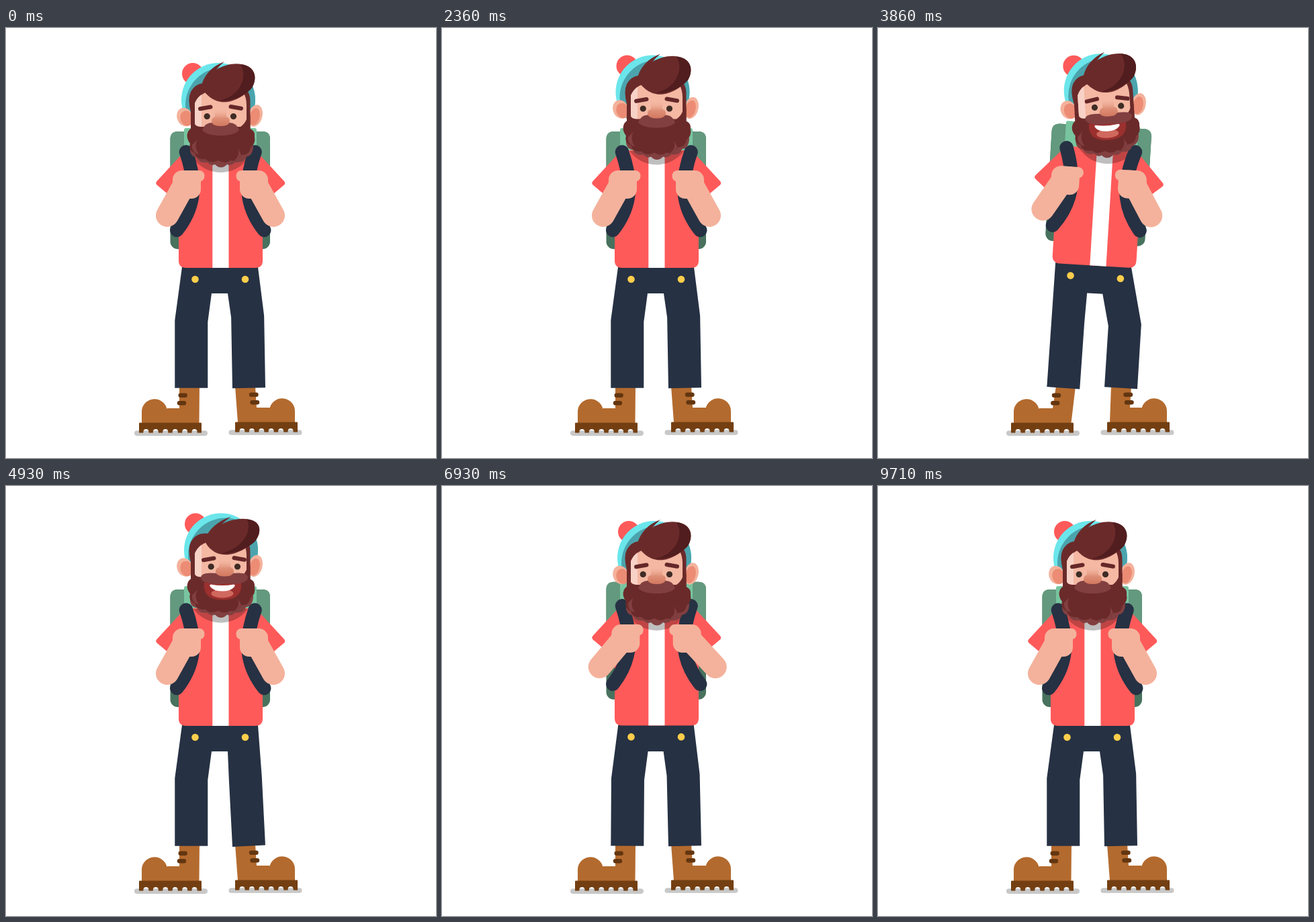
An HTML page that plays this animation: 640x640 px, repeating every 9780 ms.

```html
<!DOCTYPE html>
<html lang="en">
<head>
<meta charset="utf-8">
<title>Hiker</title>
<style>
html, body { margin: 0; width: 100%; height: 100%; overflow: hidden; background: #fff; }
svg { display: block; width: 100%; height: 100%; }
.round { fill: none; stroke-linecap: round; }
.navy { fill: #263143; }
.red { fill: #ff5a5a; }
.skin { fill: #f4b29c; }
.hair { fill: #6b2a2a; }
.light-hair { fill: #813f40; }
.leather { fill: #b36a2e; }
.sole { fill: #733f12; }
</style>
</head>
<body>
<svg viewBox="0 0 640 640">
  <defs>
    <linearGradient id="noseTone" x1="0" y1="120" x2="0" y2="146" gradientUnits="userSpaceOnUse">
      <stop offset="0" stop-color="#f2b59f" stop-opacity="0"/>
      <stop offset=".55" stop-color="#df8f77"/>
      <stop offset="1" stop-color="#d2785f"/>
    </linearGradient>
    <clipPath id="hatClip"><circle cx="316" cy="107" r="55"/></clipPath>
    <clipPath id="shirtClip"><path d="M262 183H377V357H262Z"/></clipPath>
    <path id="strap" class="round" stroke="#263143" stroke-width="20.5" d="M268 184.5C282 225 285 262 254.3 301"/>
    <path id="sleeve" class="red" d="M268 181L224.5 228Q222 231 224.5 233.5L240 246.5L266 226Z"/>
    <g id="fist" class="skin">
      <rect x="248" y="212" width="42" height="42" rx="14"/>
      <rect x="256" y="212" width="39.5" height="16.5" rx="8"/>
    </g>
  </defs>

  <g fill="#c8c8c8">
    <rect x="191" y="599.3" width="109" height="7.6" rx="3.8"/>
    <rect x="331.5" y="598.2" width="109" height="7.6" rx="3.8"/>
  </g>
  <path class="leather" id="bootL"/>
  <path class="leather" id="bootR"/>
  <path class="sole" id="soleL"/>
  <path class="sole" id="soleR"/>
  <path class="round" id="laces" stroke="#633610" stroke-width="6.4"/>

  <g id="pack">
    <rect x="244.5" y="154" width="148.5" height="175" rx="11" fill="#48725e"/>
    <path d="M244.5 240V165Q244.5 154 255.5 154H382Q393 154 393 165V240Z" fill="#63997e"/>
    <path d="M265 240V152Q265 149 268 149H370Q373 149 373 152V240Z" fill="#78c5a0"/>
  </g>

  <path class="navy" id="pants"/>

  <g id="torso">
    <g id="sleeves">
      <use href="#sleeve"/>
      <use href="#sleeve" transform="translate(638.5) scale(-1 1)"/>
    </g>
    <path class="red" d="M268 182H371L382 200V346Q382 357 371 357H268Q257 357 257 346V200Z"/>
    <path id="buttons" class="round" stroke="#ffce4b" stroke-width="10.6" d="M281.5 374h.01M356 374h.01"/>
    <rect id="stripe" x="307.3" y="182" width="24.2" height="175" fill="#fff"/>
    <g clip-path="url(#shirtClip)"><ellipse id="shade" cx="319.5" cy="170" rx="48" ry="45" opacity=".25"/></g>
    <g id="straps">
      <use href="#strap"/>
      <use href="#strap" transform="translate(638.5) scale(-1 1)"/>
    </g>
    <path class="round" id="arms" stroke="#f4b29c" stroke-width="34"/>
    <use href="#fist" id="fistL"/>
    <use href="#fist" id="fistR"/>
  </g>

  <g id="head">
    <g id="hat">
      <circle class="red" cx="278" cy="68" r="16"/>
      <circle cx="316" cy="107" r="55" fill="#6be6eb"/>
      <circle cx="323" cy="115" r="56" fill="#4ba4ad" clip-path="url(#hatClip)"/>
    </g>
    <g class="skin">
      <ellipse cx="266" cy="132.5" rx="11.5" ry="14" transform="rotate(-20 266 132.5)"/>
      <ellipse cx="371" cy="130.5" rx="10.5" ry="16.5" transform="rotate(14 371 130.5)"/>
    </g>
    <g fill="#ec8c74">
      <ellipse cx="269" cy="134.5" rx="9.5" ry="11.5" transform="rotate(-20 269 134.5)"/>
      <ellipse cx="370" cy="132" rx="7.5" ry="13" transform="rotate(14 370 132)"/>
    </g>
    <path class="hair" d="M275 152V125Q270 105 275 95Q282 82 297 82L350 85Q363 92 363.5 108V152Z"/>
    <path d="M281 150V112Q288 98 300 95L352 93Q358 103 358 115V150Z" fill="#f4b8a3"/>
    <path d="M281 140V112Q284 104 291 99V147Q281 148 281 140Z" fill="#f8d2c6"/>
    <path class="light-hair" d="M274 178Q273 191 284 193Q288 202 300 200Q305 206 311 203Q320 212 329 203Q335 206 341 200Q355 201 357 192Q368 190 368 175Z"/>
    <path class="hair" d="M275 138L281 143Q283 147 291 147H349Q355 143 358 136L363.5 130V150Q371 153 370 162Q372 172 364 178Q362 190 350 189Q345 200 334 197Q326 203 316 197Q304 203 297 195Q284 197 281 186Q271 182 274 172Q267 163 271 154Q274 150 275 150Z"/>
    <path class="light-hair" d="M285 166Q279 176 287 188Q276 185 277 174ZM345 179Q349 190 340 197Q347 197 350 188Z"/>
    <g id="features">
      <g id="mouth">
        <path d="M289 155H344Q347 181 316.5 181Q286 181 289 155Z" fill="#9b302e"/>
        <ellipse cx="316" cy="171.5" rx="16.5" ry="6.5" fill="#d0685e"/>
        <path d="M299 158Q316 161 333 158Q336.500 158.500 333 162.500Q328 168 316 168Q304 168 299 162.500Q295.500 158.500 299 158Z" fill="#fff"/>
      </g>
      <path class="light-hair" id="moustache"/>
      <path d="M311 120H328V132Q333.5 134 333 140Q331 146 319.5 146Q308 146 306 140Q305.5 134 311 132Z" fill="url(#noseTone)"/>
      <path class="round" stroke="#3e2c25" stroke-width="9.2" d="M299.2 131.5h.01M338.5 131.5h.01"/>
      <path class="round" id="brows" stroke="#652728" stroke-width="6" d="M289 120.3L304.5 117.5M334.5 117L350 119.8"/>
    </g>
    <g id="quiff">
      <path class="hair" d="M297 97Q290 90 292 82C296 70 306 57 325 50Q318 56 313 62C327 53 346 51 358 56C371 61 374 76 366 89C352 104 322 124 297 97Z"/>
      <path d="M349 54C373 57 374 76 366 89C356 101 335 110 318 108C345 103 362 75 349 54Z" fill="#511d1f"/>
    </g>
  </g>
</svg>
<script>
const LOOP = 9780;
const el = {};
document.querySelectorAll('[id]').forEach(e => el[e.id] = e);
const set = (id, value, name = 'transform') => el[id].setAttribute(name, value);
const smooth = u => u * u * (3 - 2 * u);
const mix = (a, b, k) => a + (b - a) * k;
const move = (x, y) => `translate(${x} ${y})`;

// Eased value from [time, value] pairs
function track(t, keys) {
  const i = keys.findIndex(k => k[0] > t);
  if (i === 0) return keys[0][1];
  if (i < 0) return keys[keys.length - 1][1];
  const [t0, a] = keys[i - 1], [t1, b] = keys[i];
  return mix(a, b, smooth((t - t0) / (t1 - t0)));
}

const TRACKS = {
  lean: [[2420, 0], [2980, 1], [4100, 1], [4880, 0]],
  smile: [[2450, 0], [2900, 1], [4960, 1], [5360, 0]],
  shrug: [[6130, 0], [6600, 1.6], [7400, 0]],
  lift: [[50, 0], [1450, 13.8], [2360, 11.5], [2980, 18], [3420, 10.4], [4150, 10.2], [4930, 11.5],
    [5750, 14], [5900, 14], [6500, -.6], [6930, -.6], [7200, 0], [8020, 14.6], [8150, 14.6], [9050, 0]],
  hatX: [[1900, 0], [2360, -2.5], [2900, 0], [4200, 0], [4930, 4], [5400, 0]],
  flop: [[4200, 0], [4900, 1], [5350, 0]],
  kneeOut: [[2420, 0], [2980, 10.6], [4100, 10.6], [4900, -3.7], [5300, 0]]
};

function solePath(x, y) {
  let d = `M${x} ${y + 1}q0-1 1-1h91q1 0 1 1v14`;
  for (let i = 0; i < 6; i++) d += 'h-6.43v-1.5a4 4 0 0 0-8 0v1.5';
  return d + 'h-6.42Z';
}
set('soleL', solePath(198, 587.5), 'd');
set('soleR', solePath(341, 586.5), 'd');

// Point fixed to the torso, in stage coordinates
function onTorso(x, y, lean, bob) {
  const a = 3.5 * lean * Math.PI / 180, dx = x - 319.5, dy = y - 357;
  return [319.5 + 2 * lean + dx * Math.cos(a) - dy * Math.sin(a),
    357 - bob + .45 * lean + dx * Math.sin(a) + dy * Math.cos(a)];
}

function leg(hip, crotch, footX, side, bend, kneeY) {
  const w = side * 24.5;
  const k = (kneeY - hip[1]) / (535.5 - hip[1]);
  const kneeX = mix(hip[0], footX + w, k) + side * bend;
  const tilt = Math.atan2(kneeX - footX - w, 535.5 - kneeY);
  const c = w * Math.cos(tilt), s = w * Math.sin(tilt);
  return [hip, [kneeX, kneeY], [footX + c, 535.7 + s], [footX - c, 535.7 - s],
    [kneeX - 2 * w, kneeY + 2.5], crotch];
}

function drawLegs(lean, bob, kneeOut) {
  const slack = Math.sqrt(Math.max(0, 1 - bob / 3.3));
  const hipL = onTorso(262 + .5 * bob * (1 - lean), 356, lean, bob);
  const hipR = onTorso(375 - .5 * bob * (1 - lean), 356, lean, bob);
  const bendR = Math.max(0, 4.7 * slack + kneeOut);
  const left = leg(hipL, [306 + bob + 1.3 * lean, 395 - .6 * lean], 275.8, -1, 6 * slack, 435);
  const right = leg(hipR, [330 - .7 * bob + 7 * lean, 395 + .8 * lean], 361.5, 1,
    bendR, 433 - bendR + 18.6 * lean);
  set('pants', 'M' + left.concat(right.reverse()).map(p => p.join(' ')).join('L') + 'Z', 'd');

  set('bootL', `M${258 + 7 * lean} 533H${288 + 6 * lean}L287.5 588H202V572
    A19 19 0 0 1 239.5 567V566H${258 + 2 * lean}Z`, 'd');
  set('bootR', `M${341 + 6 * lean} 533H${371 + 6 * lean}L${373 + 2 * lean} 565H392.5V566
    A19 19 0 0 1 430 571V587H345Z`, 'd');
  const l = 2.3 * lean, r = 3.5 * lean;
  set('laces', `M${259.7 + l} 546.7h7M${258 + l} 558.2h7M${365 + r} 545.7h7.5M${366.5 + r} 557.2h7.5`, 'd');
}

function drawMouth(smile) {
  const m = (a, b) => mix(a, b, smile);
  set('mouth', `translate(316 157) scale(${m(.6, 1)} ${smile}) translate(-316 -157)`);
  set('mouth', smile > 0 ? 'inline' : 'none', 'display');
  const start = `${m(292, 284)} ${m(152, 147)}`, low = m(160, 159);
  set('moustache', `M${start}Q${m(296, 285)} 141 ${m(306, 298)} 141
    Q315 141 319.5 143Q324 141 ${m(333, 341)} 141Q${m(343, 353)} 141 ${m(347, 354)} ${m(152, 147)}
    Q${m(340, 354)} ${low} 319.5 ${m(160, 157)}Q${m(299, 284)} ${low} ${start}Z`, 'd');
}

function draw(now) {
  const t = now % LOOP, v = {};
  for (const name in TRACKS) v[name] = track(t, TRACKS[name]);
  const { lean, smile, shrug, lift, flop } = v;
  const bob = 3.9 * smooth((1 - Math.cos(t / LOOP * 8 * Math.PI)) / 2);

  const body = `${move(2 * lean, .45 * lean - bob)} rotate(${3.5 * lean} 319.5 357)`;
  set('torso', body);
  set('pack', body + move(0, -1.2 * bob - 10 * shrug));
  set('stripe', move(6 * lean, 0));
  set('buttons', move(4 * lean, 0));
  set('shade', move(8 * lean, -lift));
  set('sleeves', move(0, -4.5 * shrug));
  set('straps', move(0, -5.5 * shrug));

  const fx = 4.3 * shrug, fy = -5.3 * shrug, elbowY = 279 - .3 * bob - 9 * shrug;
  set('fistL', move(fx, fy));
  set('fistR', move(638 - fx, fy) + ' scale(-1 1)');
  set('arms', `M${240 - .4 * bob - 5 * shrug} ${elbowY}L${265 + fx} ${234 + fy}
    M${398 + .4 * bob + 8.5 * shrug} ${elbowY}L${373 - fx} ${234 + fy}`, 'd');
  drawLegs(lean, bob, v.kneeOut);

  set('head', `${move(20 * lean, -bob - lift)} rotate(${-3.6 * lean} 320 175)`);
  set('hat', move(v.hatX, 0));
  set('features', move(6 * smile, 0));
  set('brows', move(-smile, 1.5 * smile));
  set('quiff', `${move(320 + 2 * flop, 110 + 3.5 * flop)} skewX(${-8 * flop})
    scale(1 ${1 - .06 * flop}) translate(-320 -110)`);
  drawMouth(smile);
}

function tick() {
  draw(performance.now());
  requestAnimationFrame(tick);
}
tick();
</script>
</body>
</html>
```
